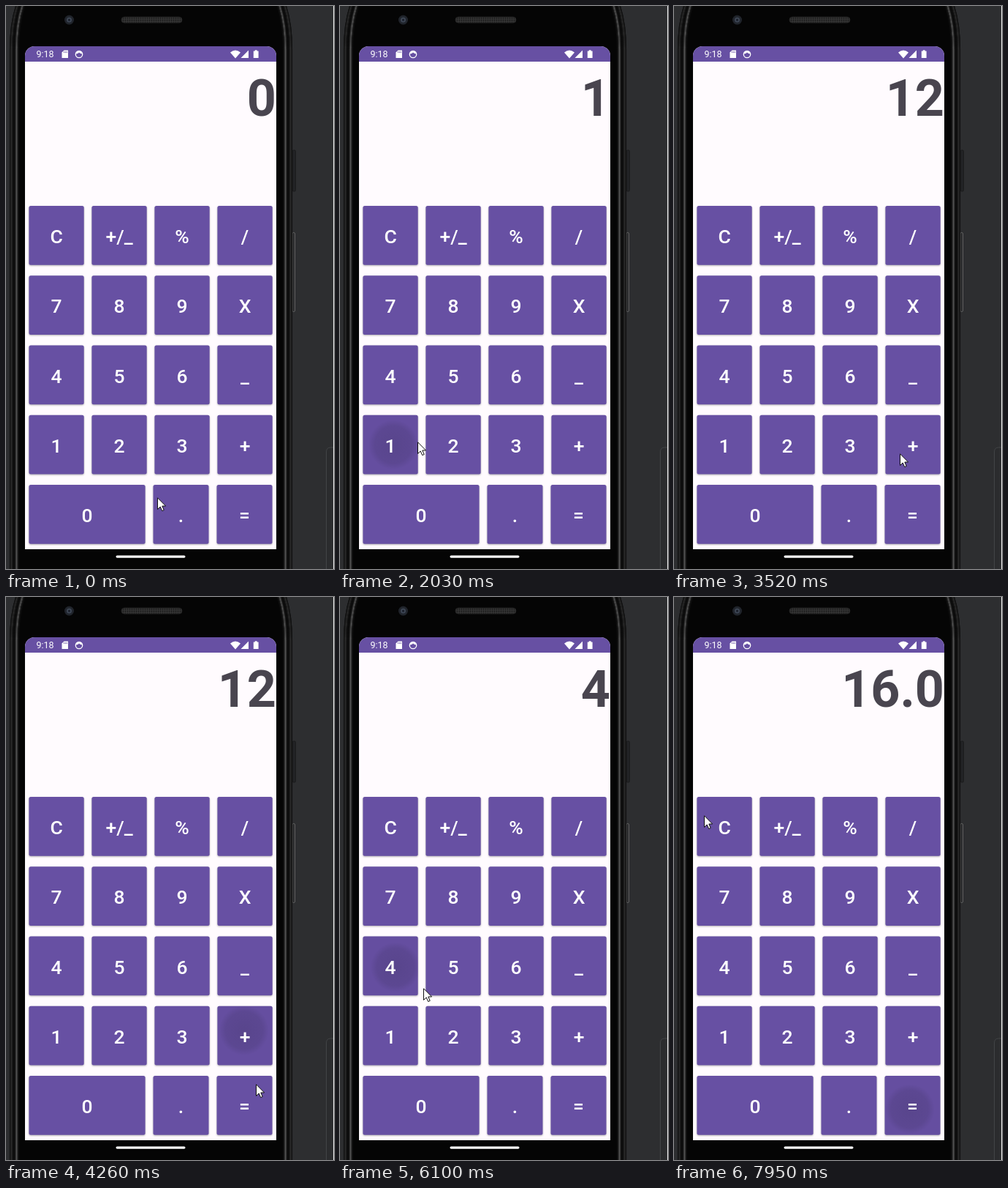
Animation, 449 px wide and 769 px high, one loop 8 s. Source, as an HTML page:

```html
<!DOCTYPE html>
<html lang="en">
<head>
<meta charset="utf-8">
<title>Calculator</title>
<style>
html, body { margin: 0; width: 100%; height: 100%; overflow: hidden; background: #2d2e30; }
svg { display: block; font-family: Roboto, sans-serif; }
#keys rect { fill: #6750a3; filter: drop-shadow(0 1.5px 1.3px rgba(0, 0, 0, .3)); }
#labels { fill: #fff; font-size: 26.5px; font-weight: 500; text-anchor: middle; }
#display { fill: #49454f; font-size: 70px; font-weight: 700; text-anchor: end; }
</style>
</head>
<body>
<svg width="449" height="769" viewBox="0 0 449 769">
  <defs id="defs">
    <radialGradient id="ink">
      <stop offset="0" stop-color="#57448a" stop-opacity=".9"/>
      <stop offset=".75" stop-color="#57448a" stop-opacity=".65"/>
      <stop offset="1" stop-color="#57448a" stop-opacity="0"/>
    </radialGradient>
    <pattern id="mesh" width="3" height="3" patternUnits="userSpaceOnUse">
      <rect width="3" height="3" fill="#333"/>
      <circle cx="1.5" cy="1.5" r=".9" fill="#171717"/>
    </pattern>
  </defs>

  <path d="M438.5 769V609q0-6 6-6H449V769" fill="#2b2c2e" stroke="#424446"/>
  <rect x="448" width="1" height="769" fill="#e8e8e8"/>

  <rect x="392" y="197" width="4.5" height="56" rx="1.5" fill="#222325" stroke="#1a1b1c"/>
  <rect x="392" y="309.500" width="3.500" height="108" rx="1.5" fill="#28292b" stroke="#626262"/>
  <g id="phone" fill="none"></g>
  <circle cx="86.5" cy="19" r="6.5" fill="#20242b"/>
  <circle cx="86.5" cy="19" r="3.5" fill="#3c4553"/>
  <circle cx="86.5" cy="19" r="1.5" fill="#171c26"/>
  <rect x="158" y="15" width="83" height="8" rx="4" fill="url(#mesh)" stroke="#262626" stroke-width=".8"/>

  <path d="M26 742V68a13 13 0 0 1 13-13H357a13 13 0 0 1 13 13V742z" fill="#fffbfe"/>
  <path d="M26 76V68a13 13 0 0 1 13-13H357a13 13 0 0 1 13 13V76z" fill="#6750a3"/>
  <rect x="150.5" y="750.5" width="95" height="3.2" rx="1.6" fill="#fff"/>

  <g fill="#fff">
    <text x="41.5" y="70.3" font-size="12.5">9:18</text>
    <path d="M79.5 60.500H85V71H76.500V63.500z"/>
    <path d="M79.500 62v2M81.500 62v2M83.300 62v2" stroke="#6750a3" stroke-width=".8"/>
    <circle cx="100" cy="66" r="4.7" fill="none" stroke="#fff" stroke-width="1.3"/>
    <path d="M95.500 65a4.600 4.600 0 0 1 9 0q-2 .8-4.500-1.500-2 2.300-4.500 1.500z"/>
    <path d="M307 63.500q7-6 14 0L314 71.500z"/>
    <path d="M332 60.500V71H321.500z"/>
    <path d="M340.800 60.200h2.800v1.300h2V71h-6.800V61.500h2z"/>
  </g>

  <text id="display" x="370" y="150.3">0</text>
  <g id="keys"></g>
  <g id="inks"></g>
  <g id="labels"></g>
  <path id="cursor" d="M.5.800V16.500L4.200 13 6.700 18.600 9.200 17.500 6.800 12H11.600z" fill="#fff" stroke="#111"/>
</svg>
<script>
const LOOP = 8000, STEP = 60;
const $ = id => document.getElementById(id);
const clamp = u => Math.min(1, Math.max(0, u));
const mix = (a, b, u) => a + (b - a) * u;

function add(parent, tag, attrs, text = '') {
  const el = document.createElementNS('http://www.w3.org/2000/svg', tag);
  for (const k in attrs) el.setAttribute(k, attrs[k]);
  el.textContent = text;
  parent.append(el);
  return el;
}

// Phone body, then its rim as thin lines whose shade peaks near the inner edge
const rail = o => [x => x + o, x => 397 - x - o]
  .map(at => `M${at(13)} 0Q${at(5)} 25 ${at(5)} 60V769`).join('');
add($('phone'), 'path', { d: 'M13 0Q5 25 5 60V769H392V60Q392 25 384 0z', fill: '#050505' });
for (let o = 0.5; o < 13; o++) {
  const bump = (at, width) => Math.exp(-(((o - at) / width) ** 2));
  const shade = 12 + 30 * bump(2.5, 1.5) + 72 * bump(9.5, 1.4);
  add($('phone'), 'path', { d: rail(o), stroke: `rgb(${shade},${shade},${shade})`, 'stroke-width': 1.2 });
}

// Keypad: four columns, the last row with a wide zero
const boxes = {};
['C +/_ % /', '7 8 9 X', '4 5 6 _', '1 2 3 +', '0 . ='].forEach((row, r) => {
  row.split(' ').forEach((label, c) => {
    const y = 273 + 95.25 * r;
    let x = 31.4 + 86 * c, width = 75.3;
    if (label === '0') width = 159.2;
    else if (r === 4) [x, width] = [114.5 + 87 * c, 76];
    const box = boxes[label] = { x, y, width, height: 80.8, rx: 2.5 };
    add($('keys'), 'rect', box);
    add($('labels'), 'text', { x: x + width / 2, y: y + 51 }, label);
  });
});

// Pointer moves: start, end, target x, y, bend of the curve, power of the ease-in
const moves = [
  [0, 240, 97, 671],
  [430, 970, 79, 599],
  [1840, 2340, 153, 587],
  [2520, 2640, 155, 589],
  [2850, 2910, 183, 597],
  [2910, 3580, 324, 586, 0, 130],
  [3580, 3640, 324, 581],
  [4080, 4260, 342, 665],
  [4260, 4830, 221, 654, 0, 35],
  [4830, 5130, 118, 532],
  [5250, 5610, 86, 508],
  [5920, 6340, 321, 725, 0, 0, 2.5],
  [6680, 6800, 317, 707],
  [7110, 7830, 26, 325, 384, 0],
  [7830, 7950, 41, 298]
];

function tip(t) {
  let pos = [207, 671];
  for (const [start, end, x, y, bendX = 0, bendY = 0, power = 1] of moves) {
    if (t < start) break;
    const held = t >= end ? end : start + Math.floor((t - start) / STEP) * STEP;
    const u = ((held - start) / (end - start)) ** power;
    const bow = 2 * u * (1 - u);
    pos = [mix(pos[0], x, u) + bow * bendX, mix(pos[1], y, u) + bow * bendY].map(Math.round);
  }
  return pos;
}

const isDigit = key => /\d/.test(key);

// Each press spreads a ripple between pointer and key centre; operators stay lit until the next press
const presses = [['1', 1780], ['2', 2820], ['+', 4070], ['4', 5860], ['=', 7050]].map(([key, start], i, all) => {
  const box = boxes[key], [x, y] = tip(start);
  const next = all[i + 1]?.[1] ?? Infinity;
  const clip = add($('defs'), 'clipPath', { id: 'clip' + i });
  add(clip, 'rect', box);
  const g = add($('inks'), 'g', { 'clip-path': `url(#clip${i})` });
  add(g, 'rect', { ...box, fill: '#57448a', opacity: .12 });
  const dot = add(g, 'circle', {
    cx: mix(x, box.x + box.width / 2, .6), cy: mix(y, box.y + box.height / 2, .6), fill: 'url(#ink)'
  });
  return { key, start, end: isDigit(key) ? start + 420 : next + STEP, g, dot };
});

function reading(t) {
  let shown = '0', sum = 0, fresh = true;
  for (const { key, start } of presses) {
    if (t < start + STEP) break;
    if (isDigit(key)) {
      shown = fresh ? key : shown + key;
      fresh = false;
    } else {
      sum += +shown;
      if (key === '=') shown = sum.toFixed(1);
      fresh = true;
    }
  }
  return shown;
}

function draw() {
  const t = performance.now() % LOOP;
  $('cursor').setAttribute('transform', `translate(${tip(t)})`);
  $('display').textContent = reading(t);
  for (const { start, end, g, dot } of presses) {
    const age = t - start;
    g.setAttribute('opacity', age < 0 ? 0 : clamp((end - t) / 120));
    dot.setAttribute('r', 34 * clamp(.5 + age / 180));
  }
  requestAnimationFrame(draw);
}
draw();
</script>
</body>
</html>
```
